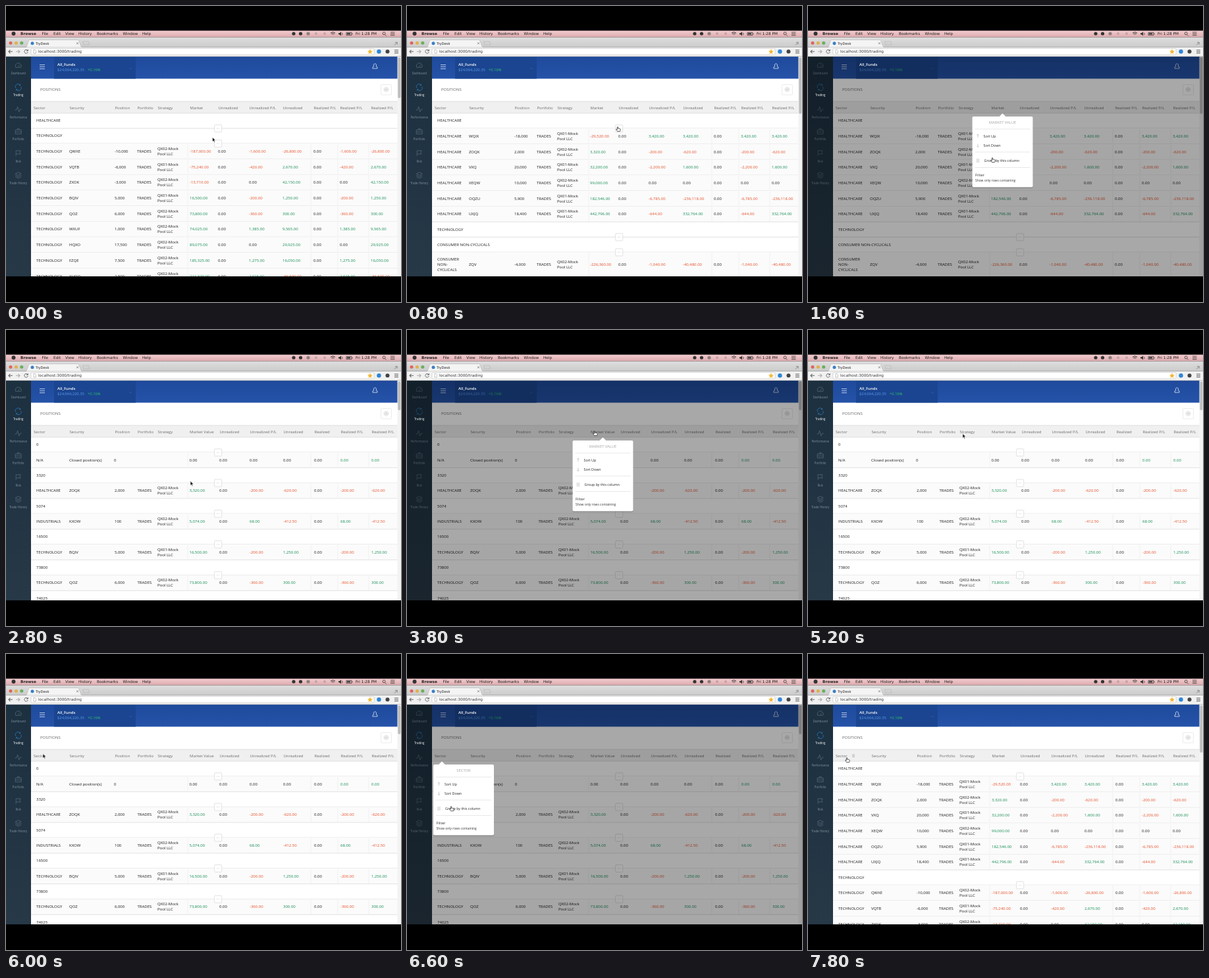
An HTML page for the animation above (8000 ms loop, 600 by 450 pixels).

```html
<!DOCTYPE html>
<html lang="en">
<head>
<meta charset="utf-8">
<title>Trading positions</title>
<style>
html, body { margin: 0; width: 100%; height: 100%; overflow: hidden; background: #000; }
svg { display: block; width: 600px; height: 450px; }
text { font-family: "Open Sans", sans-serif; font-size: 6px; fill: #1c1c1c; white-space: pre; }
.mac text { font-family: "DejaVu Sans", sans-serif; font-size: 5.75px; fill: #222; }
.line { fill: none; stroke-width: .8; }
</style>
</head>
<body>
<svg id="stage" viewBox="0 0 600 450">
  <defs>
    <linearGradient id="bar" x2="0" y2="1"><stop stop-color="#f3cdd0"/><stop offset="1" stop-color="#dba9ad"/></linearGradient>
    <linearGradient id="tabs" x2="0" y2="1"><stop stop-color="#dedede"/><stop offset="1" stop-color="#cbcbcb"/></linearGradient>
    <linearGradient id="side" x2="0" y2="1"><stop stop-color="#1c3040"/><stop offset="1" stop-color="#273846"/></linearGradient>
    <linearGradient id="blue" x2="0" y2="1"><stop stop-color="#1f4a9c"/><stop offset="1" stop-color="#2553a8"/></linearGradient>
  </defs>
</svg>
<script>
const LOOP = 8000, STEP = 200;
const GREEN = '#148c53', RED = '#e64f28', DARK = '#1c1c1c';
const stage = document.getElementById('stage');

function add(parent, tag, attrs, content) {
  const el = document.createElementNS('http://www.w3.org/2000/svg', tag);
  for (const key in attrs) el.setAttribute(key, attrs[key]);
  if (content !== undefined) el.textContent = content;
  parent.append(el);
  return el;
}
const group = (parent, attrs) => add(parent, 'g', attrs);
const rect = (p, x, y, width, height, fill, more) => add(p, 'rect', { x, y, width, height, fill, ...more });
const dot = (p, cx, cy, r, fill) => add(p, 'circle', { cx, cy, r, fill });
const line = (p, d, stroke, more) => add(p, 'path', { d, stroke, class: 'line', ...more });
// y is the vertical middle of the text
const label = (p, x, y, text, fill = DARK, style = '') =>
  add(p, 'text', { x, y: y + 2.1, style: `fill:${fill};${style}` }, text);

/* Positions: ticker, quantity, fund, market value, day P/L, total P/L */
const parse = (sector, list) => list.split('|').map(row => {
  const [ticker, qty, fund, ...money] = row.trim().split(' ');
  return { sector, ticker, qty: (+qty).toLocaleString('en-US'), fund, money: money.map(Number) };
});
const health = parse('HEALTHCARE', `WQIX -18000 1 -29520 3420 3420|ZOQK 2000 2 3320 -200 -620|
  VXQ 20000 1 32200 -2200 1600|XEQW 10000 2 99000 0 0|OQZU 5900 1 182546 -6785 -236118|
  UXJQ 18400 1 442796 -644 332764`);
const tech = parse('TECHNOLOGY', `QWXE -10000 2 -187000 -1600 -26800|VQTB -6000 1 -75240 -420 2670|
  ZXOK -3000 2 -13710 0 42150|BQIV 5000 1 16500 -200 1250|QOZ 6000 2 73800 -360 300|
  WXUF 1000 2 74025 1385 9565|HQXO 17500 2 89075 0 29925|FZQE 7500 2 185325 1275 16050|
  XUQO 2500 2 211320 2925 -36500`);
const staples = parse('CONSUMER NON- CYCLICALS', 'ZQV -4000 2 -226360 -1040 -40480');
const industry = parse('INDUSTRIALS', 'KXOW 100 2 5074 68 -412.5');
const closed = { sector: 'N/A', ticker: 'Closed position(s)', qty: '0', money: [0, 0, 0], closed: true };

const sectorGroups = (showHealth, showTech) => [
  ['HEALTHCARE', showHealth ? health : []], ['TECHNOLOGY', showTech ? tech : []],
  ['CONSUMER NON-CYCLICALS', staples], ['INDUSTRIALS', industry]];
const marketGroups = [['0', [closed]], ['3320', [health[1]]], ['5074', industry],
  ['16500', [tech[3]]], ['73800', [tech[4]]], ['74025', [tech[5]]]];

const layouts = {
  wide: [46, 96, 165, 199, 230, 279, 322, 369, 420, 467, 507, 554],
  shifted: [46, 94, 163, 197, 228, 278, 321, 367, 419, 466, 507, 554],
  market: [46, 96, 165, 199.5, 230, 278.5, 324, 370, 421, 468, 508, 555]
};
const money = n => n.toLocaleString('en-US', { minimumFractionDigits: 2 });
const tint = n => n < 0 ? RED : n > 0 ? GREEN : DARK;

function drawRow(g, cols, row, y) {
  const sectorLines = row.sector.split(' ');
  const h = row.closed ? 23.4 : sectorLines.length > 1 ? 37 : 23.7;
  const mid = y + h / 2;
  rect(g, 38, y, 557, h, '#fbfbfb');
  line(g, `M38 ${y + h}H595`, '#dcdcdc');
  for (const x of [276, 463, 504, 551]) line(g, `M${x} ${y + 1}V${y + h - 1}`, '#f0f0f0');
  sectorLines.forEach((s, i) => label(g, cols[0], mid + (i - (sectorLines.length - 1) / 2) * 8, s));
  label(g, cols[1], mid, row.ticker);
  label(g, cols[2] - (row.closed ? 1 : 0), mid, row.qty);
  if (!row.closed) {
    label(g, cols[3], mid, 'TRADES');
    label(g, cols[4], mid - 4, `QX0${row.fund}-Mock`);
    label(g, cols[4], mid + 4, 'Pool LLC');
  }
  const [value, day, total] = row.money;
  [value, 0, day, total, 0, day, total].forEach((n, i) =>
    label(g, cols[5 + i], mid, money(n), row.closed && i > 4 ? GREEN : tint(n)));
  return h;
}

function drawTable(parent, cols, groups, byMarket) {
  const g = group(parent, {});
  rect(g, 38, 145, 557, 18, '#f0f0f0');
  line(g, 'M38 145H595M38 163H595', '#d8d8d8');
  const heads = ['Sector', 'Security', 'Position', 'Portfolio', 'Strategy', byMarket ? 'Market Value' : 'Market',
    'Unrealized', 'Unrealized P/L', 'Unrealized', byMarket ? 'Realized' : 'Realized P/L', 'Realized P/L', 'Realized P/L'];
  heads.forEach((h, i) => label(g, i ? cols[i] + .5 : 42, 154.5, h, '#6c6c6c'));
  const toggles = [];
  let y = 163;
  for (const [name, rows] of groups) {
    if (y > 411) break;
    label(g, 46, y + 11.3, name);
    y += 23;
    line(g, `M38 ${y}H595`, '#d6d6d6');
    toggles.push(y);
    for (const row of rows) if (y < 411) y += drawRow(g, cols, row, y);
  }
  for (const ty of toggles) {
    rect(g, 316.7, ty - 5.3, 11, 11, '#fff', { rx: 1, stroke: '#d6d6d6', 'stroke-width': .7 });
    line(g, `M320 ${ty + .2}h4.5`, '#ccc', { 'stroke-dasharray': '1 .8' });
  }
  return g;
}

/* Page */
const page = group(stage, {});
const accents = group(stage, {});
rect(page, 37, 76, 563, 335, '#fff');
/* Start, table, scrollbar thumb height */
const tables = [
  [0, drawTable(page, layouts.wide, sectorGroups(false, true)), 62],
  [400, drawTable(page, layouts.shifted, sectorGroups(false, false)), 100],
  [800, drawTable(page, layouts.shifted, sectorGroups(true, false)), 86],
  [2000, drawTable(page, layouts.market, marketGroups, true), 44],
  [7000, drawTable(page, layouts.wide, sectorGroups(true, true)), 72]
];
const hover = line(page, 'M67 153h4M67 154.7h4M67 156.4h4', '#999', { style: 'stroke-width:.6' });

rect(page, 38, 77, 557, 33.5, 'url(#blue)');
rect(page, 73, 77, 124, 33.5, '#1b4590');
line(page, 'M51 89.5h8M51 92.5h8M51 95.5h8', '#dfe8f6');
label(accents, 78, 88.7, 'All_Funds', '#fff', 'font-weight:600');
label(page, 78, 97.3, '$24,964,220.35', '#5d9bea', 'font-size:5.8px');
label(page, 124, 97.3, '+0.16%', '#2fc26c', 'font-size:5.8px');
line(page, 'M187 94l2 2l2-2', '#34609f');
line(page, 'M557 95v-2.2l2-1.2a2.2 2.2 0 1 1 3 0l2 1.2V95z', '#dfe8f6');
label(page, 52, 127, 'POSITIONS', '#666');
rect(page, 569.5, 119.5, 16, 15.5, '#fff', { rx: 1, stroke: '#e6e6e6', 'stroke-width': .8 });
add(page, 'circle', { cx: 577.5, cy: 127, r: 3.2, class: 'line', stroke: '#b5b5b5', 'stroke-dasharray': '1.4 .6' });
add(page, 'circle', { cx: 577.5, cy: 127, r: 1.4, class: 'line', stroke: '#b5b5b5' });
rect(page, 594.5, 76.5, 5.5, 334.5, '#f3f3f3');
const thumb = rect(page, 595.3, 78, 4, 44, '#bdbdbd', { rx: 2 });

/* Sidebar */
rect(page, 0, 76, 38, 335, 'url(#side)');
const icons = [
  'M-4 3a4.5 4.5 0 1 1 8 0zM0 2L2-1',
  'M-4 1A4 4 0 0 1 3-3M4-1A4 4 0 0 1-3 3M3-5v2H1M-3 5V3h2',
  'M-5 1h2l2-5l2 8l2-4h2',
  'M-4.5-2h9v6h-9zM-1.5-2v-2h3v2M-4.5 1h9',
  'M-3.5 4v-8h7l-1.5 2.5l1.5 2.5h-7',
  'M0-4.5l4.5 2.2L0 0l-4.5-2.3zM-4.5 0L0 2.3L4.5 0M-4.5 2.3L0 4.5l4.5-2.2'
];
['Dashboard', 'Trading', 'Performance', 'Portfolio', 'Risk', 'Trade History'].forEach((name, i) => {
  const y = 90.3 + i * 33.4, active = i === 1;
  line(page, icons[i], active ? '#2a78b5' : '#526877', { transform: `translate(18.7 ${y})` });
  label(active ? accents : page, 18.7, y + 11.5, name, active ? '#fff' : '#83939f', 'font-size:4.4px;text-anchor:middle');
});

/* Dimmed page and column menu */
const scrim = rect(stage, 0, 76, 600, 335, '#000', { opacity: .34 });
stage.append(accents);
const menu = group(stage, {});
rect(menu, 0, 168, 92, 108, '#000', { opacity: .18, rx: 2, transform: 'translate(0 1)' });
rect(menu, 0, 168, 92, 107.5, '#fff', { rx: 2 });
const pointer = add(menu, 'path', { d: 'M-5 168.3l5-5l5 5z', fill: '#fff' });
const title = label(menu, 46, 176.9, '', '#a3a3a3', 'font-size:5.8px;text-anchor:middle');
line(menu, 'M4 187H88M4 222H88M4 245.5H88', '#e2e2e2');
line(menu, 'M8.5 200v-5M7 196.5l1.5-1.5l1.5 1.5M8.5 209.5v5M7 213l1.5 1.5l1.5-1.5M6 233h5M6 235h5M6 237h5', '#aaa', { style: 'stroke-width:.6' });
[['Sort Up', 17, 198.3], ['Sort Down', 17, 211.8], ['Group by this column', 18, 234.4]].forEach(([s, x, y]) =>
  label(menu, x, y, s, '#222', 'font-size:5.35px'));
label(menu, 4.5, 256.5, 'Filter', '#333');
label(menu, 4.5, 264.8, 'Show only rows containing', '#333', 'font-size:4.95px');

/* Desktop and browser frame */
const mac = group(stage, { class: 'mac' });
rect(mac, 0, 0, 600, 37.5, '#000');
rect(mac, 0, 411, 600, 39, '#000');
rect(mac, 0, 37.5, 600, 10, 'url(#bar)');
dot(mac, 11.5, 42, 3, '#333');
label(mac, 22, 42, 'Browse', '#222', 'font-weight:bold');
[['File', 54.5], ['Edit', 72], ['View', 90], ['History', 110], ['Bookmarks', 138], ['Window', 177.5], ['Help', 207]]
  .forEach(([s, x]) => label(mac, x, 42, s));
for (const x of [437, 447.5, 459]) dot(mac, x, 42, 2.6, x < 450 ? '#333' : '#8d7f82');
dot(mac, 471, 42, 2, '#c4a3a7');
dot(mac, 484, 42, 2, '#c4a3a7');
line(mac, 'M493 41.2q3.5-3 7 0M494.5 42.8q2-1.6 4 0M496.5 44.3h.2', '#333', { style: 'stroke-width:1' });
add(mac, 'path', { d: 'M505 41.3h1.5l2.5-2v6l-2.5-2H505z', fill: '#333' });
line(mac, 'M510.3 40.5q1.6 1.8 0 3.6', '#333');
line(mac, 'M517 40.3h8v4h-8zM526 41.5v1.6', '#333');
rect(mac, 518, 41.3, 5, 2, '#333');
const clock = label(mac, 531, 42, '');
line(mac, 'M575.8 43.6l1.9 1.9M576.2 41.7a2 2 0 1 1-4 0a2 2 0 1 1 4 0', '#333');
line(mac, 'M584 40h6.5M584 42.3h6.5M584 44.6h6.5', '#333');

rect(mac, 0, 47.5, 600, 15, 'url(#tabs)');
['#e0645c', '#e2b04a', '#68b05c'].forEach((c, i) => dot(mac, 7 + i * 8.4, 56.3, 2.5, c));
add(mac, 'path', { d: 'M31 62.7l3.5-10.2q.4-1 1.5-1h73q1.1 0 1.5 1l4 10.2z', fill: '#f4f4f4', stroke: '#aaa', 'stroke-width': .5 });
dot(mac, 40, 56.7, 2.5, '#3b7fc4');
label(mac, 45, 56.7, 'TryDesk', '#222', 'font-size:5.2px');
line(mac, 'M107 55.2l3 3M110 55.2l-3 3', '#777');
line(mac, 'M118 59l-1.5-5h9l1.5 5z', '#bbb');
line(mac, 'M590 59.5l4-4M591 55.3h3.2v3.2', '#777');
rect(mac, 0, 62.5, 600, 14.5, '#f1f1f1');
line(mac, 'M0 76.6H600', '#b5b5b5');
line(mac, 'M10 69.3H4M6.5 66.8L4 69.3l2.5 2.5', '#666', { style: 'stroke-width:1.1' });
line(mac, 'M15 69.3h6M18.5 66.8l2.5 2.5l-2.5 2.5', '#aaa', { style: 'stroke-width:1.1' });
line(mac, 'M33 68a2.7 2.7 0 1 0 .2 2M33.3 66v2.2h-2.2', '#666', { style: 'stroke-width:1' });
rect(mac, 38, 64.5, 521, 9.7, '#fff', { rx: 1.5, stroke: '#c0c0c0', 'stroke-width': .6 });
line(mac, 'M42 66.5h2.2l1.2 1.2v4.3H42z', '#999', { style: 'stroke-width:.6' });
label(mac, 49, 69.1, 'localhost:3000/trading', '#333', 'font-size:5.85px');
add(mac, 'path', { d: 'M553 65.3l1.2 2.6 2.8.3-2.1 1.9.6 2.8-2.5-1.5-2.5 1.5.6-2.8-2.1-1.9 2.8-.3z', fill: '#f0b93a' });
dot(mac, 566.5, 69.3, 3.2, '#2f86d6');
dot(mac, 579.5, 69.3, 3, '#444');
line(mac, 'M590 67h6M590 69.3h6M590 71.6h6', '#666', { style: 'stroke-width:1' });

/* Pointers */
const ink = { 'stroke-width': .7, 'stroke-linejoin': 'round' };
const arrow = add(stage, 'path', { d: 'M-2-3.5v7l1.6-1.5 1.1 2.5 1.2-.5-1.1-2.4h2.2z', fill: '#111', stroke: '#fff', ...ink });
const hand = add(stage, 'path', {
  d: 'M-1.5 3.6L-3.3.8q-.2-1 .9-.5l.7.7v-4q.7-1 1.4 0v2.5q.7-.6 1.2 0q.8-.4 1.2.2q.9-.2 1 .6v1.7l-.6 1.6z',
  fill: '#fff', stroke: '#222', ...ink
});

/* Time, x, y, pointer */
const route = [
  [0, 315.5, 203, arrow], [200, 321, 209, hand], [400, 321, 209, hand], [600, 321, 187, hand], [800, 321, 187, hand],
  [1200, 290, 157, hand], [1400, 288, 175, hand], [1600, 281, 234, hand], [2000, 281, 234, hand],
  [2200, 282, 233, arrow], [3000, 282, 233, arrow], [3400, 286, 157, hand], [3800, 286, 157, hand],
  [4200, 293, 163, hand], [4800, 293, 163, hand], [5000, 270, 162, arrow], [5800, 58, 155, arrow],
  [6000, 58, 155, arrow], [6200, 58, 155, hand], [6600, 68, 235, hand], [7000, 68, 235, hand],
  [7200, 68, 228, arrow], [7600, 60, 161, hand], [LOOP, 60, 161, hand]
];
/* Open, close, left edge, pointer x, title */
const menus = [
  [1200, 2000, 249.5, 46, 'MARKET VALUE'],
  [3600, 4200, 251.5, 46, 'MARKET VALUE'],
  [6200, 7000, 40, 13, 'SECTOR']
];
const show = (el, on) => { el.style.display = on ? '' : 'none'; };

function render(now) {
  const t = Math.floor(now % LOOP / STEP) * STEP;

  const current = tables.filter(([start]) => start <= t).pop();
  for (const entry of tables) show(entry[1], entry === current);
  thumb.setAttribute('height', current[2]);
  show(hover, t >= 7600);
  clock.textContent = t < 7000 ? 'Fri 1:28 PM' : 'Fri 1:29 PM';

  const open = menus.find(([from, to]) => t >= from && t < to);
  show(scrim, open);
  show(menu, open);
  if (open) {
    menu.setAttribute('transform', `translate(${open[2]} 0)`);
    pointer.setAttribute('transform', `translate(${open[3]} 0)`);
    title.textContent = open[4];
  }

  const next = route.findIndex(stop => stop[0] > t);
  const [t0, x0, y0, shape] = route[next - 1], [t1, x1, y1] = route[next];
  const p = (t - t0) / (t1 - t0), k = p * p * (3 - 2 * p);
  show(arrow, shape === arrow);
  show(hand, shape === hand);
  shape.setAttribute('transform', `translate(${x0 + (x1 - x0) * k} ${y0 + (y1 - y0) * k})`);
}

const begin = performance.now();
function tick() {
  render(performance.now() - begin);
  requestAnimationFrame(tick);
}
tick();
</script>
</body>
</html>
```
